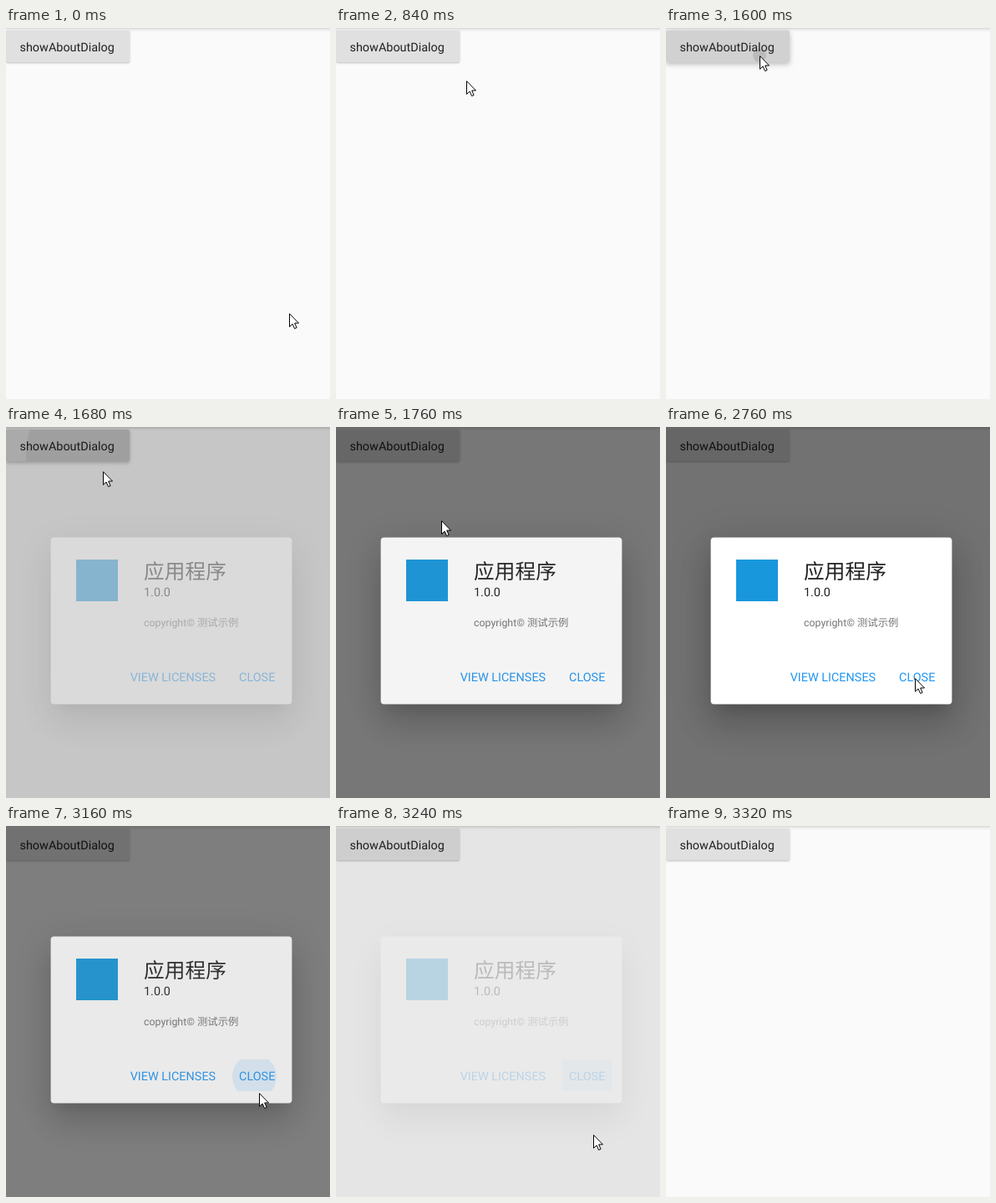
Write an HTML page that moves like this. It is 388 by 445 pixels and loops after 4 s.

```html
<!DOCTYPE html>
<html lang="zh-CN">
<head>
<meta charset="utf-8">
<title>showAboutDialog</title>
<style>
html, body { margin: 0; width: 100%; height: 100%; overflow: hidden; background: #fafafa; }
#stage { position: relative; width: 388px; height: 445px; overflow: hidden; background: #fafafa; }
#stage div, #stage svg { position: absolute; }
svg { left: 0; top: 0; overflow: visible; }
text { font: 14.42px Roboto, "Noto Sans CJK SC", "Noto Sans CJK", sans-serif; fill: #212121;
  white-space: pre; text-rendering: geometricPrecision; }
#bar { left: 0; top: 0; width: 388px; height: 5px; background: linear-gradient(rgba(0,0,0,.14), rgba(0,0,0,.05) 45%, transparent); }
#button { left: 0; top: 3px; width: 148px; height: 38px; border-radius: 2px; overflow: hidden; }
#scrim, #dialog { left: 0; top: 0; width: 388px; height: 445px; }
#scrim { background: #000; }
#card { left: 54px; top: 133px; width: 288px; height: 199px; border-radius: 4px;
  box-shadow: 0 11px 15px -7px rgba(0,0,0,.15), 0 25px 39px 3px rgba(0,0,0,.13), 0 9px 47px 8px rgba(0,0,0,.11); }
#mark { left: 84px; top: 159px; width: 50px; height: 50px; background: #1897dc; }
#close { left: 271px; top: 280px; width: 60px; height: 38px; border-radius: 2px; overflow: hidden; }
.splash { border-radius: 50%; }
#close .splash { background: rgba(33,150,243,.13); }
#button .splash { background: rgba(0,0,0,.11); }
.action { fill: #2196f3; }
</style>
</head>
<body>
<div id="stage">
  <div id="bar"></div>
  <div id="button"><div class="splash"></div></div>
  <svg width="388" height="445"><text x="16.5" y="27.6">showAboutDialog</text></svg>
  <div id="scrim"></div>
  <div id="dialog">
    <div id="card"></div>
    <svg width="388" height="445"><rect x="53.6" y="132.6" width="288.8" height="200" rx="4" fill="#fff"/></svg>
    <div id="mark"></div>
    <div id="close"><div class="splash"></div></div>
    <svg width="388" height="445">
      <text x="165" y="182.3" style="font-size:24.72px">应用程序</text>
      <text x="165" y="203">1.0.0</text>
      <text x="165" y="239" style="font-size:12.36px;fill:#757575">copyright© 测试示例</text>
      <text class="action" x="148.7" y="305">VIEW LICENSES</text>
      <text class="action" x="279" y="305">CLOSE</text>
    </svg>
  </div>
  <svg id="cursor" width="13" height="20">
    <path d="M.5 .7V16.4L4.1 13L6.6 18.6L9.1 17.5L6.7 12H11.5Z" fill="#fff" stroke="#000"/>
  </svg>
</div>
<script>
const LOOP = 4000, STEP = 80, FADE = 150;
const PRESS = 1400, RELEASE = 1600, OPEN = 1644, CLOSE = 3110, END = 3320;
const $ = s => document.querySelector(s);
const ramp = (t, a, b) => Math.max(0, Math.min(1, (t - a) / (b - a)));
const mix = (a, b, k) => a + (b - a) * k;

// The screen refreshes every STEP ms, counted anew from each of these times.
const refresh = [0, 120, 1440, 2600];
function snap(now) {
  const start = refresh.filter(v => v <= now).pop();
  return start + Math.floor((now - start) / STEP) * STEP;
}

function bezier(x1, y1, x2, y2) {
  const at = (p, q, s) => 3 * p * s * (1 - s) ** 2 + 3 * q * s * s * (1 - s) + s ** 3;
  return x => {
    let lo = 0, hi = 1;
    for (let i = 0; i < 24; i++) {
      const m = (lo + hi) / 2;
      if (at(x1, x2, m) < x) lo = m; else hi = m;
    }
    return at(y1, y2, (lo + hi) / 2);
  };
}
const ease = bezier(.25, .1, .25, 1);
const easeOut = bezier(0, 0, .58, 1);
const easeIn = k => k * k;
const smooth = k => k * k * (3 - 2 * k);
const linear = k => k;

// Pointer strokes: begin, end, destination, easing.
const home = [339, 342];
const strokes = [
  [40, 120, 298, 198, linear],
  [280, 600, 159, 65, easeOut],
  [760, 1320, 112, 33, smooth],
  [RELEASE, 1760, 126, 112, easeIn],
  [1760, 1920, 180, 225, linear],
  [1920, 2480, 328, 380, easeOut],
  [2480, 2760, 298, 301, smooth],
  [3000, 3160, 303, 320, easeIn],
  [3160, END, 313, 420, linear]
];
function pointer(t) {
  let [x, y] = home;
  for (const [a, b, toX, toY, curve] of strokes) {
    const k = curve(ramp(t, a, b));
    x = mix(x, toX, k);
    y = mix(y, toY, k);
  }
  return [Math.round(x), Math.round(y)];
}

function splash(el, x, y, r, alpha) {
  Object.assign(el.style, {
    left: x - r + "px", top: y - r + "px", width: 2 * r + "px", height: 2 * r + "px", opacity: alpha
  });
}

const button = $("#button"), scrim = $("#scrim"), dialog = $("#dialog"), cursor = $("#cursor");
const buttonInk = $("#button .splash"), closeInk = $("#close .splash");

function draw(t) {
  const press = ramp(t, PRESS, PRESS + 120) * (1 - ramp(t, RELEASE, RELEASE + 200));
  const grey = mix(224, 209, press);
  button.style.background = `rgb(${grey},${grey},${grey})`;
  button.style.boxShadow = `0 ${1 + 1.5 * press}px ${2.5 + 3.5 * press}px rgba(0,0,0,.25)`;

  const spread = 8 * ramp(t, PRESS, RELEASE) + Math.max(0, t - RELEASE);
  splash(buttonInk, 112, 30, spread, 1 - ramp(t, RELEASE, RELEASE + 200));
  splash(closeInk, 26, 20, 15 * ramp(t, 2800, 3080) + 11.5 * Math.max(0, t - 3080) / STEP, 1);

  const shown = ramp(t, OPEN, OPEN + FADE) - ramp(t, CLOSE, CLOSE + FADE);
  scrim.style.opacity = shown ? .54 * ease(shown) : 0;
  dialog.style.opacity = shown ? easeOut(shown) : 0;

  const [x, y] = pointer(t);
  cursor.style.transform = `translate(${x}px,${y}px)`;
  cursor.style.visibility = t < END ? "visible" : "hidden";
}

function frame() {
  draw(snap(performance.now() % LOOP));
  requestAnimationFrame(frame);
}
frame();
</script>
</body>
</html>
```
